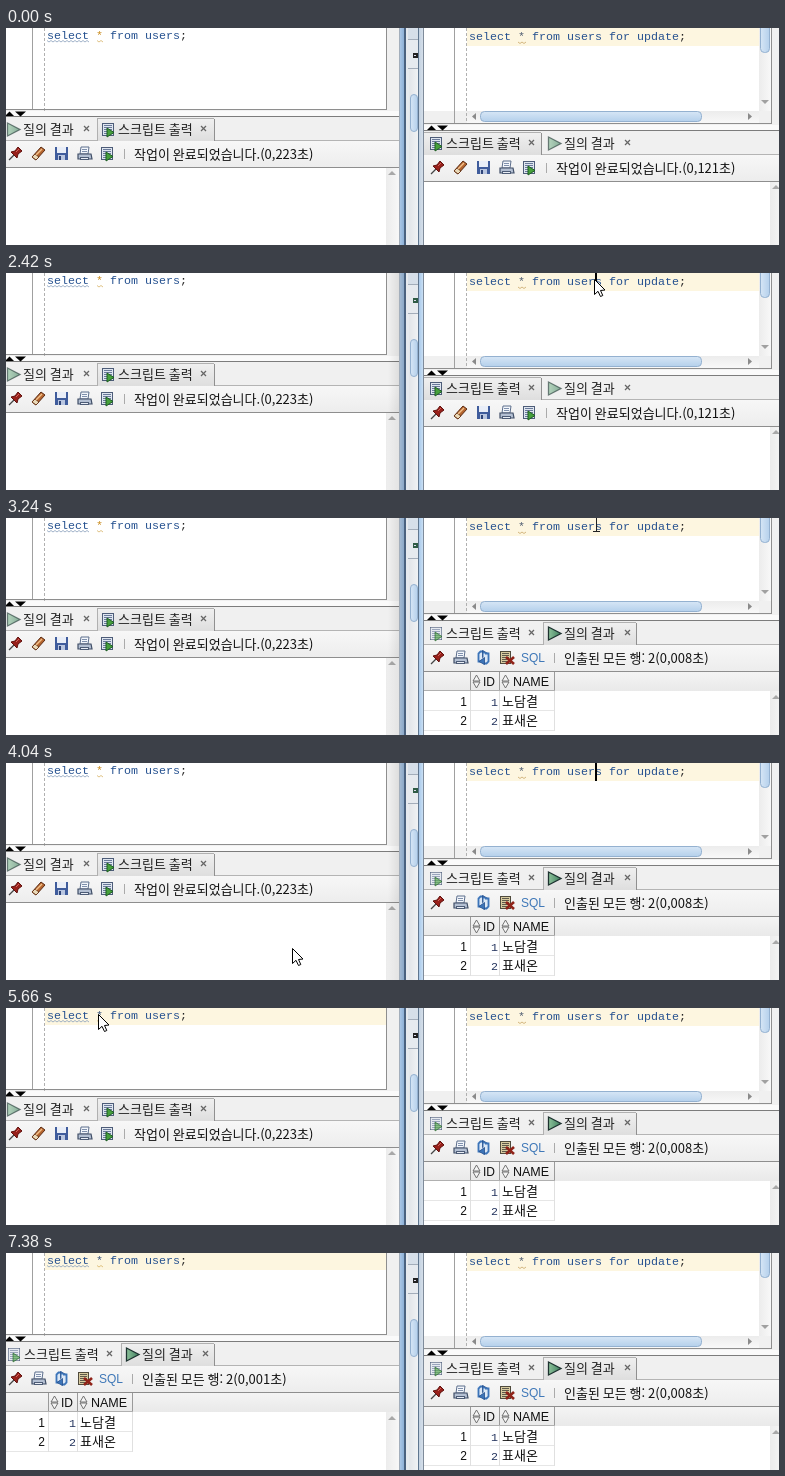
An HTML page with a canvas for the animation above (8 s loop, 773x217 px).

```html
<!DOCTYPE html>
<html lang="ko">
<head>
<meta charset="utf-8">
<title>select for update</title>
<style>
html, body { margin: 0; width: 773px; height: 217px; overflow: hidden; background: #f0f0f0; }
canvas { display: block; }
</style>
</head>
<body>
<canvas id="stage" width="773" height="217"></canvas>
<script>
const ctx = document.getElementById('stage').getContext('2d');
const LOOP = 8000;
const UI = '13px "Noto Sans CJK KR", "Noto Sans CJK", sans-serif';
const LATIN = '12px "Liberation Sans", sans-serif';
const CODE = '11.667px "Liberation Mono", monospace';
const PEOPLE = ['노담결', '표새온'];

function box(x, y, w, h, color) {
  ctx.fillStyle = color;
  ctx.fillRect(x, y, w, h);
}

function frame(x, y, w, h, color) {
  box(x, y, w, 1, color);
  box(x, y + h - 1, w, 1, color);
  box(x, y, 1, h, color);
  box(x + w - 1, y, 1, h, color);
}

function poly(points, fill, line, width = 1) {
  ctx.beginPath();
  for (let i = 0; i < points.length; i += 2) ctx.lineTo(points[i], points[i + 1]);
  ctx.closePath();
  if (fill) { ctx.fillStyle = fill; ctx.fill(); }
  if (line) { ctx.strokeStyle = line; ctx.lineWidth = width; ctx.stroke(); }
}

function stroke(points, color, width = 1) {
  ctx.beginPath();
  for (let i = 0; i < points.length; i += 2) ctx.lineTo(points[i], points[i + 1]);
  ctx.strokeStyle = color;
  ctx.lineWidth = width;
  ctx.stroke();
}

function label(str, x, y, font = UI, color = '#111', align = 'left') {
  ctx.font = font;
  ctx.textAlign = align;
  ctx.fillStyle = color;
  ctx.fillText(str, x, y);
}

function gradient(x, y, w, h, from, to, across) {
  const g = across ? ctx.createLinearGradient(x, 0, x + w, 0) : ctx.createLinearGradient(0, y, 0, y + h);
  g.addColorStop(0, from);
  g.addColorStop(1, to);
  return g;
}

function shade(x, y, w, h, from, to, across) {
  box(x, y, w, h, gradient(x, y, w, h, from, to, across));
}

function thumb(x, y, w, h, across) {
  ctx.beginPath();
  ctx.roundRect(x + 0.5, y + 0.5, w - 1, h - 1, 4);
  ctx.fillStyle = gradient(x, y, w, h, '#d8e7f6', '#b3cfeb', across);
  ctx.fill();
  ctx.strokeStyle = '#94b1d0';
  ctx.lineWidth = 1;
  ctx.stroke();
}

function at(x, y, draw) {
  ctx.save();
  ctx.translate(x, y);
  draw();
  ctx.restore();
}

// Icons, each about 15 px with its origin at the top left
const icon = {
  pin() {
    stroke([1, 14, 6, 9], '#444', 1.3);
    poly([3, 6, 9, 12, 10, 8, 14, 5, 10, 1, 7, 5], '#98211b', '#5f100c');
    stroke([8, 6, 11, 3], '#d5665c');
  },
  pencil() {
    poly([1, 11, 10, 1, 14, 4, 5, 14], '#b5652e', '#5b2c14');
    poly([1, 11, 4, 8, 8, 11, 5, 14], '#e9d9b8', '#6d3a1c');
    stroke([5, 9, 11, 3], '#f2c08a', 1.4);
  },
  disk() {
    box(1, 1, 13, 13, '#3f5c9c');
    box(3, 1, 9, 6, '#e9eef8');
    box(4, 9, 7, 5, '#b9c6e0');
    box(5, 10, 2, 4, '#2e4478');
  },
  printer() {
    poly([4, 1, 12, 1, 11, 8, 3, 8], '#f4f7fc', '#5d6f8c');
    poly([1, 8, 14, 8, 15, 13, 1, 13], '#b4c0d3', '#3f4d66', 1.2);
    box(3, 11, 9, 3, '#e8edf5');
    frame(3, 11, 9, 3, '#4d5c76');
    box(5, 3, 5, 1, '#7f90ac');
    box(5, 5, 5, 1, '#7f90ac');
  },
  script() {
    box(1, 1, 12, 13, '#dfe6f0');
    frame(1, 1, 12, 13, '#4d5c78');
    for (let y = 3; y < 12; y += 2) box(3, y, 8, 1, '#6a7a9a');
    poly([6, 6, 13, 10.5, 6, 15], '#46a13c', '#1d5c23');
  },
  play() {
    poly([1.5, 1, 14, 7.5, 1.5, 14], gradient(1, 0, 13, 15, '#8fc49c', '#3f7f5f', true), '#1d3230', 1.3);
  },
  refresh() {
    for (const turn of [0, Math.PI]) {
      at(7.5, 7.5, () => {
        ctx.rotate(turn);
        box(-6, -6, 6, 10, '#dce8f6');
        stroke([-1.5, 4, -5, 4, -5, -4, -3, -6, 0, -6], '#3c74b8', 1.8);
        poly([-1, -7, 4.5, -4, -1, 0], '#3c74b8', '#254f8c', 0.8);
      });
    }
  },
  cancel() {
    box(1, 1, 11, 13, '#d8cba0');
    frame(1, 1, 11, 13, '#4f4a3c');
    for (let y = 3; y < 12; y += 2) box(3, y, 7, 1, '#5f5a4c');
    stroke([7, 7, 15, 14], '#8f2218', 2.6);
    stroke([15, 7, 7, 14], '#8f2218', 2.6);
  }
};

function put(name, x, y) { at(x, y, icon[name]); }

function closeMark(x, y) {
  stroke([x, y, x + 5, y + 5], '#666', 1.3);
  stroke([x + 5, y, x, y + 5], '#666', 1.3);
}

function tab(kind, x, from, to, on) {
  if (on) {
    shade(from, 90, to - from, 23, '#f0f0f0', '#dedede');
    box(from, 90, to - from, 1, '#b0b0b0');
    box(from, 90, 1, 23, '#b0b0b0');
    box(to, 91, 1, 22, '#909090');
  }
  ctx.globalAlpha = on ? 1 : 0.6;
  put(kind, x, 94);
  ctx.globalAlpha = 1;
  const isScript = kind === 'script';
  label(isScript ? '스크립트 출력' : '질의 결과', x + 17, 106, UI, '#222');
  closeMark(x + (isScript ? 100 : 78), 98);
}

function sortMark(x, y) {
  poly([x, y + 6, x + 3.5, y, x + 7, y + 6], '#f4f4f4', '#666', 0.9);
  poly([x, y + 7, x + 3.5, y + 13, x + 7, y + 7], '#f4f4f4', '#666', 0.9);
}

function table(left, right) {
  shade(left, 140, right - left, 19, '#f4f4f4', '#e9e9e9');
  sortMark(45, 143);
  sortMark(74, 143);
  label('ID', 55, 154, LATIN);
  label('NAME', 85, 154, '12.5px "Liberation Sans", sans-serif');
  PEOPLE.forEach((name, i) => {
    const y = 174 + i * 19;
    label(i + 1, 39, y, LATIN, '#111', 'right');
    label(i + 1, 70, y, CODE, '#26365f', 'right');
    label(name, 74, y);
  });
  for (const y of [178, 198]) box(left, y, 127 - left, 1, '#e6e6e6');
  for (const x of [42, 71, 126]) {
    box(x, 140, 1, 19, '#9a9a9a');
    box(x, 159, 1, 40, '#e0e0e0');
  }
  box(left, 158, 127 - left, 1, '#b0b0b0');
}

// stage: 0 message, 1 result toolbar, 2 rows fetched
function results(left, right, stage, secs, scrollX, queryFirst) {
  box(left, 83, right - left, 134, '#f0f0f0');
  box(left, 83, right - left, 5, '#fafafa');
  box(left, 88, right - left, 1, '#7c7c7c');
  poly([-1, 88, 3.5, 83.5, 8, 88], '#000');
  poly([9, 83.5, 20, 83.5, 14.5, 88.5], '#000');
  box(left, 112, right - left, 1, '#b4b4b4');
  if (queryFirst && !stage) {
    tab('play', 0, -1, 91, false);
    tab('script', 95, 91, 208, true);
  } else {
    tab('script', 1, left, 113, !stage);
    tab('play', 119, 115, 208, stage > 0);
  }
  shade(left, 113, right - left, 26, '#f7f7f7', '#ededed');
  const names = stage ? ['pin', 'printer', 'refresh', 'cancel'] : ['pin', 'pencil', 'disk', 'printer', 'script'];
  names.forEach((name, i) => put(name, 2 + i * 23, 118));
  if (stage) label('SQL', 93, 130, LATIN, '#3f78b8');
  box(stage ? 126 : 118, 121, 1, 10, '#aaa');
  if (stage) label('인출된 모든 행: 2(' + secs + '초)', 136, 131);
  else label('작업이 완료되었습니다.(' + secs + '초)', 128, 131);
  box(left, 139, right - left, 78, '#fff');
  const top = stage === 2 ? 160 : 140;
  shade(scrollX, 140, 13, 77, '#ececec', '#f7f7f7', true);
  poly([scrollX + 2, top + 7, scrollX + 6, top + 3, scrollX + 10, top + 7], '#a8a8a8');
  if (stage === 2) table(left, right);
  box(left, 139, right - left, 1, '#8e8e8e');
}

function squiggle(x, y, w, color) {
  const pts = [];
  for (let i = 0; i <= w; i += 2) pts.push(x + i, y + (i / 2 % 2 ? 1.5 : 0));
  stroke(pts, color, 0.8);
}

function code(str, x, y, starColor) {
  [...str].forEach((ch, i) => {
    const color = ch === '*' ? starColor : ch === ';' ? '#222' : '#24508f';
    label(ch, x + i * 7, y, CODE, color);
  });
}

function dashes(x, bottom) {
  for (let y = 0; y < bottom; y += 5) box(x, y, 1, 3, '#b0b0b0');
}

function leftEditor(focus) {
  box(0, 0, 380, 82, '#fff');
  if (focus) box(39, 0, 341, 17, '#fdf6e0');
  box(26, 0, 1, 81, '#a0a0a0');
  dashes(38, 81);
  box(380, 0, 1, 82, '#8e8e8e');
  box(0, 81, 381, 1, '#8e8e8e');
  code('select * from users;', 41, 11, focus ? '#33507a' : '#c98a1a');
  squiggle(41, 12.5, 42, '#8aa0bb');
  squiggle(91, 12.5, 7, '#d8b468');
}

function rightEditor() {
  box(418, 0, 335, 83, '#fff');
  box(418, 83, 347, 12, '#f0f0f0');
  box(461, 0, 292, 18, '#fdf6e0');
  box(448, 0, 1, 95, '#a0a0a0');
  dashes(460, 95);
  code('select * from users for update;', 463, 12, '#4d5b70');
  squiggle(512, 14, 8, '#c9a868');
  shade(753, 0, 12, 83, '#ececec', '#f8f8f8', true);
  thumb(754, -8, 10, 33, true);
  poly([755, 72, 763, 72, 759, 76], '#a0a0a0');
  shade(461, 83, 292, 12, '#ececec', '#f8f8f8');
  thumb(474, 83, 222, 11);
  poly([470, 85, 470, 92, 466, 88.5], '#8a8a8a');
  poly([742, 85, 742, 92, 746, 88.5], '#8a8a8a');
  box(417, 95, 349, 1, '#8e8e8e');
  box(765, 0, 1, 96, '#8e8e8e');
}

function windowEdges(rightActive) {
  box(393, 0, 1, 217, '#a3aebb');
  shade(394, 0, 4, 217, rightActive ? '#a3bad3' : '#a9c6e6', rightActive ? '#8ba8c8' : '#8db0d6', true);
  box(398, 0, 2, 217, '#4a6280');
  box(400, 0, 12, 217, '#e6eaef');
  box(402, 0, 10, 11, '#d6dfe9');
  box(402, 11, 10, 1, '#a3adba');
  box(402, 40, 10, 1, '#a3adba');
  shade(403, 41, 9, 176, '#e2e5e9', '#f0f2f4', true);
  thumb(404, 66, 8, 38, true);
  box(407, 25, 5, 5, rightActive ? '#2f5c46' : '#222');
  box(408, 27, 2, 1, '#dde');
  box(412, 0, 1, 217, '#5f768f');
  shade(413, 0, 4, 217, rightActive ? '#a8c8e9' : '#c3d1e0', rightActive ? '#c9dff4' : '#d5dfea', true);
  box(417, 0, 1, 217, '#7f8b9a');
  if (rightActive) shade(382, 0, 11, 217, 'rgba(0,0,0,0)', 'rgba(0,0,0,.08)', true);
}

function arrow(x, y) {
  at(x + 0.5, y + 0.5, () => poly([0, 0, 0, 15, 3.5, 11.8, 6, 17, 8.3, 16, 6, 11, 10.5, 10.5], '#fff', '#000'));
}

function beam(x, y) {
  box(x, y - 7, 1, 14, '#222');
  for (const end of [-8, 6]) {
    box(x - 3, y + end, 3, 1, '#222');
    box(x + 1, y + end, 3, 1, '#222');
  }
}

function mouse(x, y) {
  x = Math.round(x);
  y = Math.round(y);
  const overText = (x < 380 && y < 81) || (x > 418 && x < 753 && y < 83);
  (overText ? beam : arrow)(x, y);
}

function pointer(t) {
  if (t < 300 || t >= 6580) return;
  if (t < 1020) {
    const p = Math.min(1, Math.floor((t - 300) / 100) / 6);
    const e = p * (2 - p);
    mouse(735 - 145 * e, 203 - 195 * e);
  } else if (t < 2420) beam(590, 7);
  else if (t < 2720) arrow(588, 6);
  else if (t < 3540) beam(590, 7);
  else if (t < 4440) {
    const p = Math.min(1, (Math.floor((t - 3540) / 100) + 1) / 9);
    const q = 1 - p;
    mouse(590 * q * q + 720 * p * q + 137 * p * p, 8 * q * q + 700 * p * q + 64 * p * p);
  } else if (t < 5660) {
    const p = Math.min(1, (Math.floor((t - 4440) / 100) + 1) / 4);
    const e = p * (2 - p);
    mouse(137 - 43 * e, 64 - 57 * e);
  } else if (t < 5960) arrow(92, 6);
  else beam(94, 7);
}

const within = (t, spans) => spans.some(([a, b]) => t >= a && t < b);

function carets(t) {
  if (within(t, [[1020, 1620], [2120, 3240], [3740, 4240], [4740, 4960]])) box(589, 0, 2, 18, '#000');
  if (within(t, [[4960, 5460], [5960, 6460], [6980, 7380]])) box(90, 0, 2, 17, '#000');
}

function clipped(x, w, dx, dy, draw) {
  ctx.save();
  ctx.beginPath();
  ctx.rect(x, 0, w, 217);
  ctx.clip();
  ctx.translate(dx, dy);
  draw();
  ctx.restore();
}

const stageAt = (t, start) => t < start ? 0 : t < start + 100 ? 1 : 2;

function render(t) {
  box(0, 0, 773, 217, '#f0f0f0');
  const l = stageAt(t, 5760);
  const r = stageAt(t, 2520);
  clipped(0, 393, 0, 0, () => results(0, 393, l, l ? '0,001' : '0,223', 380, true));
  clipped(417, 356, 422, 14, () => results(-5, 351, r, r ? '0,008' : '0,121', 342, false));
  leftEditor(t >= 4960);
  rightEditor();
  windowEdges(t >= 1020 && t < 4960);
  carets(t);
  pointer(t);
}

const start = performance.now();
function tick() {
  render((performance.now() - start) % LOOP);
  requestAnimationFrame(tick);
}
tick();
</script>
</body>
</html>
```
